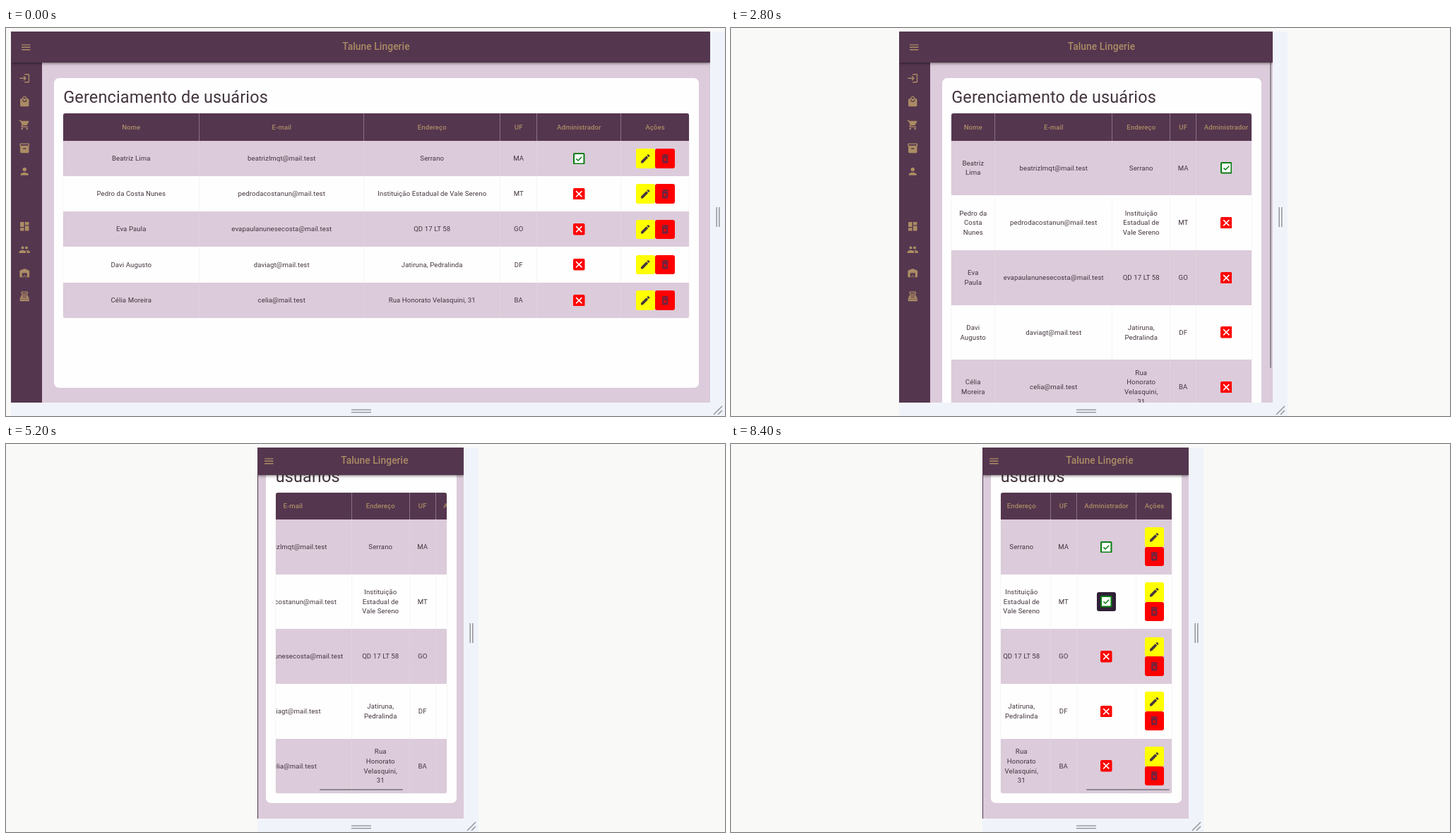
Write an HTML page that moves like this. It is 1018x550 px and loops after 10000 ms.

```html
<!DOCTYPE html>
<html lang="pt-BR">
<head>
<meta charset="utf-8">
<title>Gerenciamento de usuários</title>
<style>
  :root { --dark: #54364f; --gold: #ab8c64; --tint: #dccbda; --ink: #43343f; }
  * { box-sizing: border-box; }
  html, body { margin: 0; width: 100%; height: 100%; overflow: hidden; }
  body { background: #f9f9f8; position: relative; font: 9.625px/1.43 Roboto, sans-serif; letter-spacing: .1px; color: var(--ink); }
  svg { display: block; width: 16.5px; height: 16.5px; fill: currentColor; fill-rule: evenodd; }
  #frame, #app, header, #side, #page, .thumb, #side svg, #frame svg { position: absolute; }
  #frame { top: 5px; height: 545px; background: #f0f4fa; }
  #frame svg { width: 28px; height: 28px; fill: none; stroke: #999a9f; stroke-width: 1.6; }
  #app { top: 5px; height: 526px; overflow: hidden; background: var(--tint); }
  #view { position: relative; height: 526px; overflow: hidden; }
  header { inset: 0 0 auto; height: 44px; display: flex; align-items: center; justify-content: center; padding-left: 44px;
    background: var(--dark); color: var(--gold); font-size: 13.75px; font-weight: 500; box-shadow: 0 1px 4px #0008; }
  header svg { position: absolute; left: 13.3px; }
  #side { left: 0; top: 0; height: 100%; overflow: hidden; background: var(--dark); color: var(--gold); }
  #side svg { left: 10.75px; }
  #page { left: 0; right: 0; padding: 65.5px 16.5px 21px; }
  #card { min-height: 439.5px; padding: 13.75px; border-radius: 7px; background: #fefefe; }
  h1 { margin: 0 0 8.2px; font-size: 23.4px; line-height: 28.9px; font-weight: 400; letter-spacing: .17px; }
  #paper { position: relative; overflow: hidden; border-radius: 3px; box-shadow: 0 0 1px #0005; }
  #table { display: grid; }
  #table > div { display: flex; align-items: center; justify-content: center; text-align: center; padding: 0 10.5px; border-right: 1px solid #e8e0ea59; }
  #table > div:nth-child(6n) { border-right: 0; }
  #table > .th { background: var(--dark); color: var(--gold); font-weight: 500; }
  .odd { background: var(--tint); }
  .narrow #table > div { padding: 0; white-space: nowrap; }
  .wide br { display: none; }
  .acts { display: grid; grid-template-columns: 27.5px 27.5px; }
  .stack .acts { grid-template-columns: 27.5px; }
  .acts i, .flag { display: grid; place-items: center; width: 27.5px; height: 27.5px; border-radius: 3px; background: #ff0; color: #43343f; }
  .acts i + i { background: #f00; color: #6a2440; }
  .flag svg { fill: none; }
  .phone header { height: 38.5px; padding-left: 40px; }
  .phone header svg { left: 8.2px; }
  .phone #page { padding: 60px 10.5px 21px 11px; }
  .thumb { background: #8f8892; border-radius: 1px; }
  #vbar { right: 2.5px; width: 2px; }
  #hbar { bottom: 4.5px; width: 118px; height: 2px; }
</style>
</head>
<body>
<div id="frame"></div>
<div id="app"><div id="view">
  <div id="page"><div id="card">
    <h1>Gerenciamento de usuários</h1>
    <div id="paper"><div id="table"></div><div id="hbar" class="thumb"></div></div>
  </div></div>
  <div id="side"></div>
  <div id="vbar" class="thumb"></div>
  <header>Talune Lingerie</header>
</div></div>
<script>
const $ = id => document.getElementById(id);
const [frame, app, view, page, side, table, vbar, hbar] =
  ['frame', 'app', 'view', 'page', 'side', 'table', 'vbar', 'hbar'].map($);
const svg = (body, style = '') => `<svg viewBox="0 0 24 24" style="${style}">${body}</svg>`;
const icon = (d, style) => svg(`<path d="${d}"/>`, style);

const menu = 'M3 18h18v-2H3zm0-5h18v-2H3zm0-7v2h18V6z';
const nav = [
  'M11 7 9.6 8.4l2.6 2.6H2v2h10.2l-2.6 2.6L11 17l5-5zm9 12h-8v2h8c1.1 0 2-.9 2-2V5c0-1.1-.9-2-2-2h-8v2h8z',
  'M19 6h-2c0-2.76-2.24-5-5-5S7 3.24 7 6H5c-1.1 0-2 .9-2 2v12c0 1.1.9 2 2 2h14c1.1 0 2-.9 2-2V8c0-1.1-.9-2-2-2zm-7-3c1.66 0 3 1.34 3 3H9c0-1.66 1.34-3 3-3zm0 10c-2.76 0-5-2.24-5-5h2c0 1.66 1.34 3 3 3s3-1.34 3-3h2c0 2.76-2.24 5-5 5z',
  'M7 18a2 2 0 100 4 2 2 0 000-4zM1 2v2h2l3.6 7.6L5.2 14c-.7 1.4.3 3 1.8 3h12v-2H7.4l-.2-.4.9-1.6h7.5c.7 0 1.4-.4 1.7-1l3.6-6.5A1 1 0 0020 4H5.2l-.9-2zm16 16a2 2 0 100 4 2 2 0 000-4z',
  'M20 2H4c-1 0-2 .9-2 2v3c0 .7.4 1.4 1 1.7V20c0 1.1 1.1 2 2 2h14c.9 0 2-.9 2-2V8.7c.6-.3 1-1 1-1.7V4c0-1.1-1-2-2-2zm-5 12H9v-2h6zm5-7H4V4h16z',
  'M12 12a4 4 0 100-8 4 4 0 000 8zm0 2c-2.67 0-8 1.34-8 4v2h16v-2c0-2.66-5.33-4-8-4z',
  'M3 13h8V3H3zm0 8h8v-6H3zm10 0h8V11h-8zm0-18v6h8V3z',
  'M16 11a3 3 0 100-6 3 3 0 000 6zm-8 0a3 3 0 100-6 3 3 0 000 6zm0 2c-2.33 0-7 1.17-7 3.5V19h14v-2.5C15 14.17 10.33 13 8 13zm8 0-1 .05c1.2.84 2 1.97 2 3.45V19h6v-2.5c0-2.33-4.67-3.5-7-3.5z',
  'M22 19V8.35c0-.82-.5-1.55-1.26-1.86l-8-3.2a2 2 0 00-1.5 0l-8 3.2A2 2 0 002 8.35V19c0 1.1.9 2 2 2h3v-9h10v9h3c1.1 0 2-.9 2-2zm-11 0H9v2h2zm2-3h-2v2h2zm2 3h-2v2h2z',
  'M17 2H7a2 2 0 00-2 2v2c0 1.1.9 2 2 2h10a2 2 0 002-2V4a2 2 0 00-2-2zm0 4H7V4h10zm3 16H4a2 2 0 01-2-2v-1h20v1a2 2 0 01-2 2zm-1.5-11.8A2 2 0 0016.7 9H7.3a2 2 0 00-1.8 1.2L2 18h20zM8 11h8v1.2H8zm-.5 3h9v1.2h-9z'
];
const pencil = 'M3 17.25V21h3.75L17.8 9.94l-3.75-3.75zM20.7 7.04a1 1 0 000-1.41l-2.34-2.34a1 1 0 00-1.41 0l-1.83 1.83 3.75 3.75z';
const bin = 'M6 19c0 1.1.9 2 2 2h8c1.1 0 2-.9 2-2V7H6zm2.5-7.1 1.4-1.4 2.1 2.1 2.1-2.1 1.4 1.4-2.1 2.1 2.1 2.1-1.4 1.4-2.1-2.1-2.1 2.1-1.4-1.4 2.1-2.1zM15.5 4l-1-1h-5l-1 1H5v2h14V4z';
const yes = svg('<rect x="1.5" y="1.5" width="21" height="21" rx="1.5" fill="#fff" stroke="#0a7d14" stroke-width="3"/><path d="M6.5 12.2l3.8 3.8 7.4-7.6" stroke="#0a7d14" stroke-width="2.2"/>');
const no = svg('<rect width="24" height="24" rx="3" fill="#f00"/><path d="M6 6l12 12M18 6L6 18" stroke="#fff" stroke-width="2.3"/>');

// "|" marks where a cell breaks in the narrow layout
const users = [
  ['Beatriz|Lima', 'beatrizlmqt@mail.test', 'Serrano', 'MA'],
  ['Pedro da|Costa|Nunes', 'pedrodacostanun@mail.test', 'Instituição|Estadual de|Vale Sereno', 'MT'],
  ['Eva|Paula', 'evapaulanunesecosta@mail.test', 'QD 17 LT 58', 'GO'],
  ['Davi|Augusto', 'daviagt@mail.test', 'Jatiruna,|Pedralinda', 'DF'],
  ['Célia|Moreira', 'celia@mail.test', 'Rua|Honorato|Velasquini,|31', 'BA']
];
const cell = (html, cls) => `<div class="${cls}">${html}</div>`;
const acts = `<span class="acts"><i>${icon(pencil)}</i><i>${icon(bin)}</i></span>`;
table.innerHTML = ['Nome', 'E-mail', 'Endereço', 'UF', 'Administrador', 'Ações'].map(h => cell(h, 'th')).join('') +
  users.map((u, i) => [
    ...u.map(s => `<span>${s.replaceAll('|', '<br> ')}</span>`),
    `<span class="flag" style="background:none">${i ? no : yes}</span>`, acts
  ].map(c => cell(c, i % 2 ? '' : 'odd')).join('')).join('');
document.querySelector('header').insertAdjacentHTML('beforeend', icon(menu));
side.innerHTML = nav.map((d, i) => icon(d, `top:${57.75 + 33 * i + (i > 4 ? 45 : 0)}px`)).join('');
const grip = (d, style) => `<svg viewBox="0 0 28 28" style="${style}">${`<path d="${d}"/>`}</svg>`;
frame.innerHTML = grip('M12.2 0v28M15.8 0v28', 'right:-4px;top:249px') +
  grip('M0 12.2h28M0 15.8h28', 'left:calc(50% - 24px);top:523.5px') +
  grip('M8 20L20 8M14 20l6-6', 'right:-4px;top:522.5px');

const toggle = document.querySelectorAll('.flag')[1];
const columns = {
  990: '193px 233px 193px 52px 119px 1fr',
  705: '95.5px 166px 149px 37px 85px 1fr',
  529: '62px 166px 82px 37px 84.5px 50.5px'
};
columns[292] = columns[529];
// Value of the last [time, value] pair already reached
const at = (t, ...keys) => keys.filter(k => t >= k[0]).pop()[1];

let layout, checked;
function draw(now) {
  const t = Math.floor(now % 10000 / 200) * 200;
  const width = at(t, [0, 990], [1400, 705], [2600, 529], [3800, 292]);
  // The page is laid out again slightly after the viewport is resized
  const laid = at(t, [0, 990], [1600, 705], [2800, 529], [3800, 292]);
  const left = Math.floor(502.5 - width / 2);
  app.style.left = frame.style.left = left + 'px';
  app.style.width = width + 'px';
  frame.style.width = width + 21 + 'px';

  if (laid !== layout) {
    layout = laid;
    view.style.width = laid + 'px';
    view.className = [laid < 600 ? 'narrow' : 'wide', laid < 990 && 'stack', laid < 300 && 'phone'].filter(Boolean).join(' ');
    table.style.gridTemplate = `38.3px repeat(5, ${laid < 990 ? 77.7 : 50.25}px) / ${columns[laid]}`;
  }
  const phone = laid < 300;
  const sideWidth = phone ? at(t, [0, 5], [4000, 1]) : 44;
  side.style.width = sideWidth + 'px';
  page.style.left = sideWidth + 'px';

  const sy = at(t, [0, 0], [4200, 42], [4400, 76]);
  const sx = at(t, [0, 0], [5000, 32], [5200, 120], [5400, 200], [5600, 239]);
  page.style.transform = `translateY(${-sy}px)`;
  table.style.transform = `translateX(${-sx}px)`;

  const ratio = 526 / page.offsetHeight;
  vbar.style.top = 2 + ratio * sy + 'px';
  vbar.style.height = 526 * ratio - 4 + 'px';
  vbar.style.opacity = at(t, [0, 0], [1600, 1], [4600, .5], [4800, 0]);
  hbar.style.left = 3 + 118 * sx / 239 + 'px';
  hbar.style.opacity = at(t, [0, 0], [3800, 1], [5800, .5], [6000, 0], [8000, 1]);

  toggle.style.background = `rgba(48, 31, 56, ${at(t, [0, 0], [6800, .5], [7000, 1])})`;
  if (checked !== t >= 7400) {
    checked = t >= 7400;
    toggle.innerHTML = checked ? yes : no;
  }
}
const start = performance.now();
function loop() {
  draw(performance.now() - start);
  requestAnimationFrame(loop);
}
loop();
</script>
</body>
</html>
```
